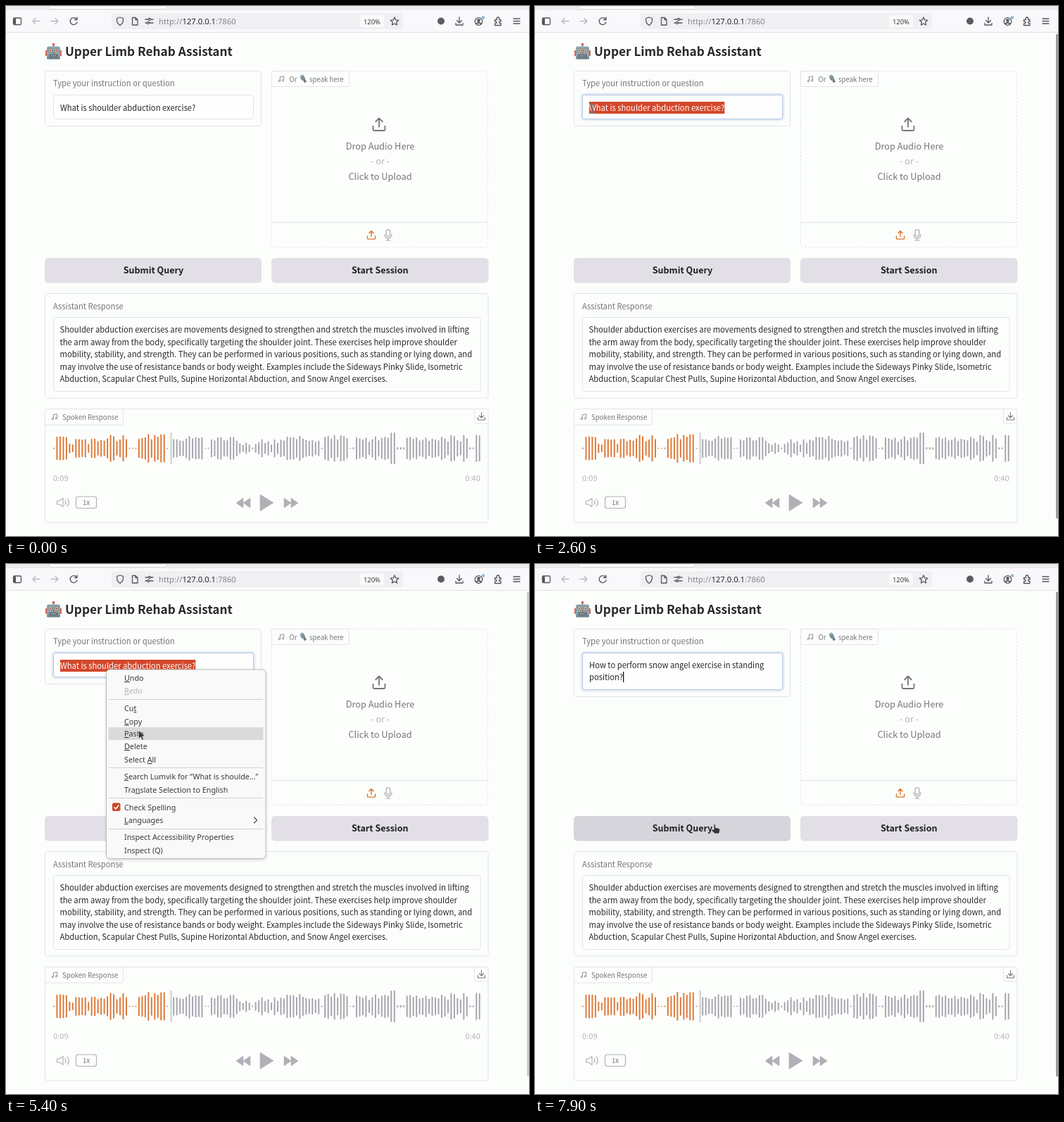
Recreate the animation shown at these times as an HTML page. Size 743 px wide and 753 px high, loop 8000 ms.

```html
<!DOCTYPE html>
<html lang="en">
<head>
<meta charset="utf-8">
<title>Rehab assistant</title>
<style>
  html, body { margin: 0; width: 100%; height: 100%; overflow: hidden; background: #fcfefc; }
  svg { display: block; }
  text { font: 11.2px "Noto Sans CJK JP", "Noto Sans CJK SC", "Noto Sans CJK", "Noto Sans", sans-serif; fill: #27272a; white-space: pre; }
  .ui text, text.ui { font: 10.75px "Noto Sans", "Open Sans", sans-serif; fill: #3a3a3d; }
  #answer text { font-size: 11.26px; }
  text.url { font-size: 11.25px; fill: #85858c; }
  text.zoom { font-size: 9.4px; }
  text.label { fill: #75757d; }
  text.small { font-size: 9.65px; fill: #75757d; }
  text.drop { font-size: 12.75px; fill: #75757d; text-anchor: middle; }
  text.btn { font-size: 12.5px; font-weight: 700; text-anchor: middle; fill: #1f1f23; }
  text.title { font-size: 17.2px; font-weight: 700; }
  text.pale { fill: #b4b4bb; }
  .box { fill: none; stroke: #e3e3e6; }
  .line { fill: none; stroke: #55555c; stroke-width: 1.3; stroke-linecap: round; stroke-linejoin: round; }
  .u { text-decoration: underline; }
</style>
</head>
<body>
<svg width="743" height="753" viewBox="0 0 743 753">
  <defs>
    <filter id="glow" x="-10%" y="-30%" width="120%" height="160%"><feGaussianBlur stdDeviation="1"/></filter>
    <filter id="shade" x="-10%" y="-10%" width="120%" height="120%"><feGaussianBlur stdDeviation="2.5"/></filter>
    <path id="upload" d="M-8 2V6.5Q-8 8 -6.5 8H6.5Q8 8 8 6.5V2M0 3V-8M-4.5 -4L0 -8.5 4.5 -4"/>
    <g id="note" fill="none" stroke="#85858c" stroke-width=".9">
      <path d="M-1.6 2.6V-3.4L3.6 -4.2V1.8"/><circle cx="-2.8" cy="2.6" r="1.2"/><circle cx="2.4" cy="1.8" r="1.2"/>
    </g>
  </defs>

  <!-- browser bar -->
  <rect width="743" height="37" fill="#f9f9fb"/>
  <rect width="743" height="6" fill="#ececee"/>
  <path d="M62 0H228V2Q228 4.500 225 4.500H65Q62 4.500 62 2Z" fill="#fff" stroke="#cfcfd3" stroke-width=".8"/>
  <path d="M0 37.500H743" stroke="#e0e0e2"/>
  <rect x="150" y="10" width="414" height="23" rx="4" fill="#f0f0f3"/>
  <rect x="503" y="13" width="34" height="17" rx="3" fill="#fafafc"/>
  <text class="ui url" x="217" y="26">http://<tspan fill="#28282c">127.0.0.1</tspan>:7860</text>
  <text class="ui zoom" x="508" y="25.500">120%</text>
  <g class="line">
    <rect x="10.500" y="17" width="11" height="9.500" rx="1.500"/><path d="M12.500 18.500V25" stroke-width="3"/>
    <path d="M48 21.500H38M42 17.500L38 21.500 42 25.500M64 21.500H74M70 17.500L74 21.500 70 25.500" stroke="#b9b9be"/>
    <path d="M100.500 19A5 5 0 1 0 101 23M101 16V19.500H97.500"/>
    <path d="M162 16L166.500 17.500Q167 24.500 162 27.500 157 24.500 157.500 17.500Z"/>
    <path d="M179.500 16.500H184L187 19.500V27H179.500ZM184 16.500V19.500H187"/>
    <path d="M198 19H202M206 19H209M198 24H200M204 24H209"/><circle cx="204" cy="19" r="1.500"/><circle cx="202" cy="24" r="1.500"/>
    <path d="M552 16L553.700 19.800 557.700 20.200 554.700 23 555.500 27 552 25 548.500 27 549.300 23 546.300 20.200 550.300 19.800Z"/>
    <path d="M644 16V23.500M640.500 20.500L644 24 647.500 20.500M639 24.500V27H649V24.500"/>
    <circle cx="671.500" cy="22" r="5.300"/><circle cx="671.500" cy="20.500" r="1.700" fill="#55555c"/><path d="M668.500 25Q671.500 22.500 674.500 25" stroke-width="2"/>
    <path d="M694.500 19.500H697.500Q696.500 16 699 16 701.500 16 700.500 19.500H703V22Q700.500 21.500 700.500 23.500 700.500 25 703 24.500V27.500H694.500V25Q697 25 697 23.500 697 22 694.500 22Z"/>
    <path d="M721 18H730M721 21.500H730M721 25H730"/>
  </g>
  <circle cx="678" cy="16.500" r="2.200" fill="#8fb7d6"/>
  <circle cx="618" cy="21.500" r="5" fill="#5b5b62"/>

  <!-- heading -->
  <g transform="translate(67.500 65)">
    <path d="M0 -6V-11" stroke="#8298a2" stroke-width="2"/><circle cy="-10.500" r="1.800" fill="#d9584a"/>
    <path d="M-11.500 -2H-8V6H-11.500ZM8 -2H11.500V6H8Z" fill="#d96852"/>
    <rect x="-9.500" y="-7.500" width="19" height="18" rx="2.500" fill="#8ea3ad"/>
    <rect x="-9.500" y="7.500" width="19" height="3" rx="1.500" fill="#6d838d"/>
    <g fill="#f2e3c4" stroke="#5a6a72" stroke-width=".8"><circle cx="-4.300" cy="-2" r="2.700"/><circle cx="4.300" cy="-2" r="2.700"/></g>
    <circle cx="-4.300" cy="-2" r="1.200" fill="#b5482f"/><circle cx="4.300" cy="-2" r="1.200" fill="#b5482f"/>
    <path d="M0 0L1.800 3H-1.800Z" fill="#d9584a"/>
    <rect x="-6" y="4" width="12" height="3.500" rx="1" fill="#46555d"/><path d="M-4 5.800H4.500" stroke="#dfe5e8" stroke-width="1.600" stroke-dasharray="1.600 1"/>
  </g>
  <text class="title" x="84" y="70.500">Upper Limb Rehab Assistant</text>

  <!-- question -->
  <rect id="panel" class="box" x="55.500" y="92.500" width="307" height="78" rx="3"/>
  <text class="label" x="67" y="114">Type your instruction or question</text>
  <rect id="halo" x="66.500" y="125.500" width="286" height="36" rx="4" fill="none" stroke="#c9d8ee" stroke-width="2" filter="url(#glow)"/>
  <rect id="input" x="67.500" y="126.500" width="284" height="34" rx="3" fill="#fdfefd" stroke="#e3e3e6"/>
  <rect id="selection" x="77" y="136" height="17" fill="#d3472b"/>
  <text id="q1" x="77" y="148.500"></text>
  <text id="q2" x="77" y="165">position?</text>
  <path id="caret" stroke="#111" stroke-width="1.300"/>

  <!-- audio drop zone -->
  <rect class="box" x="377.500" y="92.500" width="307" height="250" rx="3" stroke-dasharray="2.500 2.500"/>
  <path class="box" d="M377.500 92.500H487.500V111.500Q487.500 114.500 484.500 114.500H377.500ZM377.500 307.500H684.500"/>
  <use href="#note" x="391" y="104"/>
  <text class="small" x="402.500" y="107.500">Or</text>
  <g transform="translate(422 103.500) rotate(-28)">
    <path d="M-1 1H2.500V6H-1Z" fill="#6e7b84"/><rect x="-2.600" y="-6" width="5.600" height="8" rx="2.600" fill="#8fa6b3"/><path d="M-2.600 -2H3M-2.600 .500H3" stroke="#566670" stroke-width=".8"/>
  </g>
  <text class="small" x="431" y="107.500">speak here</text>
  <use href="#upload" class="line" style="stroke:#75757d;stroke-width:1.700" transform="translate(530 168.500) scale(1.060)"/>
  <text class="drop" x="531.500" y="204">Drop Audio Here</text>
  <text class="drop" style="fill:#b4b4bb" x="531.500" y="225">- or -</text>
  <text class="drop" x="531.500" y="246.500">Click to Upload</text>
  <use href="#upload" class="line" style="stroke:#dc7430;stroke-width:2" transform="translate(519 325.500) scale(.7)"/>
  <g class="line" style="stroke:#a9a9b0;stroke-width:1.200"><rect x="540.300" y="317.500" width="5.400" height="10" rx="2.700"/><path d="M538 324.500Q538 330 543 330 548 330 548 324.500M543 330V333M540 333H546"/></g>

  <!-- buttons -->
  <rect id="submit" x="55" y="358" width="308" height="35.500" rx="5"/>
  <rect x="377" y="358" width="308.500" height="35.500" rx="5" fill="#e2e0e6"/>
  <text class="btn" x="209.500" y="380">Submit Query</text>
  <text class="btn" x="531.300" y="380">Start Session</text>

  <!-- response -->
  <rect class="box" x="55.500" y="408.500" width="629.500" height="148.500" rx="3"/>
  <text class="label" x="67" y="431">Assistant Response</text>
  <rect class="box" x="67.500" y="442.500" width="606.500" height="105" rx="3"/>
  <g id="answer"></g>

  <!-- player -->
  <rect class="box" x="55.500" y="572.500" width="629.500" height="161.500" rx="3"/>
  <path class="box" d="M166.500 572.500V592Q166.500 595 163.500 595H55.500M665.500 572.500V590Q665.500 593 668 593H685"/>
  <use href="#note" x="69" y="584"/>
  <text class="small" x="80" y="587.800">Spoken Response</text>
  <path class="line" style="stroke:#75757d;stroke-width:1.100" d="M675.500 577.500V585M672.500 582L675.500 585 678.500 582M670.500 584.500V588H680.500V584.500"/>
  <g id="wave"></g>
  <rect x="233.500" y="606" width="2.300" height="45" fill="#d2d2d8"/>
  <text class="pale" x="67" y="674.500">0:09</text>
  <text class="pale" x="674" y="674.500" text-anchor="end">0:40</text>
  <g class="line" style="stroke:#b0b0b7;stroke-width:1.150">
    <path d="M72.500 703V708H76L81 711.500V699.500L76 703ZM84 702.500Q86 705.500 84 708.500M87 700Q91.500 705.500 87 711"/>
    <rect x="99.500" y="697" width="29" height="16.500" rx="3"/>
  </g>
  <text class="small" x="114" y="709.300" text-anchor="middle">1x</text>
  <path d="M337 699V713L327 706ZM347 699V713L337 706ZM361 694V717.500L380 705.700ZM395 699V713L405 706ZM405 699V713L415 706Z" fill="#b0b0b7" stroke="#b0b0b7" stroke-width=".6" stroke-linejoin="round"/>

  <path id="scroll" d="M741.500 40V728" stroke="#8b8b8e" stroke-width="2.400"/>

  <g id="menu" class="ui">
    <rect x="143" y="152" width="226" height="268" rx="5" fill="#0003" filter="url(#shade)"/>
    <rect x="142.500" y="150" width="226.500" height="268.500" rx="5" fill="#f9f9f9" stroke="#bdbdbf"/>
    <rect id="hover" x="145.500" width="220" height="18" fill="#dadada"/>
    <path d="M146 192.500H365M146 289.500H365M146 332.500H365M146 376.500H365" stroke="#d0d0d2"/>
    <g id="items"></g>
    <rect x="151" y="339.500" width="11.500" height="11.500" rx="2" fill="#cd4528"/>
    <path d="M153.500 345.500L156 348 160.300 342.500" fill="none" stroke="#fff" stroke-width="1.600"/>
    <path class="line" d="M352.500 360L356.500 364 352.500 368"/>
  </g>

  <g id="cursor">
    <path id="arrow" d="M0 0V12L3 9.500 5 14 7.200 13 5.200 8.700 9 8.400Z" fill="#333" stroke="#e4e4e4" stroke-width=".8"/>
    <path id="beam" d="M-3 -6.500H3M0 -6.500V6M-3 6H3" fill="none" stroke="#77777a" stroke-width="1.900"/>
    <path id="hand" d="M0 .500Q1.200 -1 2.300 .500V4.500L7 5.500Q8.800 6 8.500 8.500L7.500 13H1.500L-3.500 8.500Q-3.500 6.500 -1.500 7L0 8Z" fill="#333" stroke="#dcdcdc" stroke-width=".7"/>
  </g>
</svg>
<script>
const LOOP = 8000, STEP = 100;
const $ = id => document.getElementById(id);
const show = (id, on) => $(id).style.display = on ? '' : 'none';
const set = (id, attrs) => { for (const k in attrs) $(id).setAttribute(k, attrs[k]); };
const ramp = (t, from, to) => Math.min(1, Math.max(0, (t - from) / (to - from)));

$('answer').innerHTML = [
  'Shoulder abduction exercises are movements designed to strengthen and stretch the muscles involved in lifting',
  'the arm away from the body, specifically targeting the shoulder joint. These exercises help improve shoulder',
  'mobility, stability, and strength. They can be performed in various positions, such as standing or lying down, and',
  'may involve the use of resistance bands or body weight. Examples include the Sideways Pinky Slide, Isometric',
  'Abduction, Scapular Chest Pulls, Supine Horizontal Abduction, and Snow Angel exercises.'
].map((s, i) => `<text x="76.500" y="${464 + i * 17.55}">${s}</text>`).join('');

// An underscore marks the access key that follows it.
const items = [
  [162, '_Undo'], [180, '_Redo'], [205, 'Cu_t'], [223.5, '_Copy'], [241, '_Paste'], [259, '_Delete'],
  [278, 'Select _All'], [302, '_Search Lumvik for “What is shoulde…”'], [320.5, 'Tra_nslate Selection to English'],
  [345.5, 'Check Spelling'], [364, '_Languages'], [388, 'Inspect Accessibility Properties'], [407, 'Inspect (Q)']
];
$('items').innerHTML = items.map(([y, s], i) =>
  `<text x="168" y="${y + 4}"${i == 1 ? ' style="fill:#b5b5b8"' : ''}>${s.replace(/_(.)/, '<tspan class="u">$1</tspan>')}</text>`).join('');

// Speech bursts: number of bars, lowest and highest bar.
const bursts = [
  [1, 2, 2], [4, 31, 37], [7, 9, 27], [12, 20, 39], [3, 1, 2], [9, 26, 42], [2, 1, 2], [4, 19, 27],
  [6, 24, 35], [2, 1, 2], [9, 22, 36], [4, 6, 16], [1, 1, 3], [10, 8, 26], [7, 24, 36], [4, 10, 24],
  [1, 2, 3], [8, 25, 39], [2, 1, 3], [11, 18, 35], [2, 43, 45], [3, 1, 4], [7, 22, 36], [13, 16, 38],
  [2, 2, 8], [2, 36, 42]
];
let n = 0, bars = '';
for (const [count, low, high] of bursts) {
  for (let i = 0; i < count; i++, n++) {
    const x = 67 + n * 4.48, r = Math.abs(Math.sin(n * 12.9898 + 4) * 43758.5453) % 1;
    const h = low + (high - low) * r;
    bars += `<rect x="${x}" y="${628.5 - h / 2}" width="1.9" height="${h}" rx=".8" fill="${x < 230 ? '#dd7634' : '#a3a3ac'}"/>`;
  }
}
$('wave').innerHTML = bars;

// Pointer path: time, x, y.
const path = [
  [1400, 743, 420], [1850, 81, 146], [3000, 81, 146], [3500, 130, 181], [3800, 147, 157], [5000, 147, 157],
  [5600, 203, 264], [5700, 203, 264], [5800, 178, 248], [6400, 178, 248], [6600, 192, 234], [7000, 192, 234],
  [7100, 192, 231], [7800, 254, 370], [LOOP, 254, 370]
];
function pointer(t) {
  const i = Math.max(1, path.findIndex(p => p[0] >= t));
  const [t0, x0, y0] = path[i - 1], [t1, x1, y1] = path[i];
  const k = ramp(t, t0, t1), e = k * k * (3 - 2 * k);
  return [x0 + (x1 - x0) * e, y0 + (y1 - y0) * e];
}

function draw(t) {
  const [x, y] = pointer(t);
  const focus = t >= 2300, selected = t >= 2500 && t < 7000, menu = t >= 5000 && t < 7000, pasted = t >= 7000;
  const grow = pasted ? 18 : 0;

  set('panel', { height: 78 + grow });
  set('input', { height: 34 + grow, stroke: focus ? '#b9c7e0' : '#e3e3e6' });
  set('halo', { height: 36 + grow });
  show('halo', focus);
  $('q1').textContent = pasted ? 'How to perform snow angel exercise in standing' : 'What is shoulder abduction exercise?';
  set('q1', { y: pasted ? 147.5 : 148.5 });
  $('q1').style.fill = selected ? '#fff' : '';
  show('selection', selected);
  set('selection', { width: $('q1').getComputedTextLength() });
  show('q2', pasted);
  show('caret', pasted);
  if (pasted) set('caret', { d: `M${77.5 + $('q2').getComputedTextLength()} 153V168` });

  set('submit', { fill: t >= 7900 ? '#d6d5db' : t >= 7800 ? '#dcdae1' : '#e2e0e6' });

  // The scrollbar fades away while the menu holds the pointer.
  set('scroll', { opacity: pasted ? 1 : ramp(t, 1300, 1500) - ramp(t, 5200, 5600) });

  show('menu', menu);
  const item = items.find(([c], i) => i != 1 && Math.abs(y + 3 - c) < 9);
  show('hover', menu && t > 5000 && item);
  if (item) set('hover', { y: item[0] - 9 });

  const inField = !menu && x > 67 && x < 352 && y > 126 && y < 161 + grow;
  const onButton = y > 358 && y < 394 && (x > 55 && x < 363 || x > 377 && x < 685);
  show('cursor', t >= 1400);
  show('beam', inField);
  show('hand', onButton);
  show('arrow', !inField && !onButton);
  set('cursor', { transform: `translate(${x} ${y})` });
}

const start = performance.now();
function tick() {
  const t = (performance.now() - start) % LOOP;
  draw(Math.floor(t / STEP) * STEP);
  requestAnimationFrame(tick);
}
tick();
</script>
</body>
</html>
```
